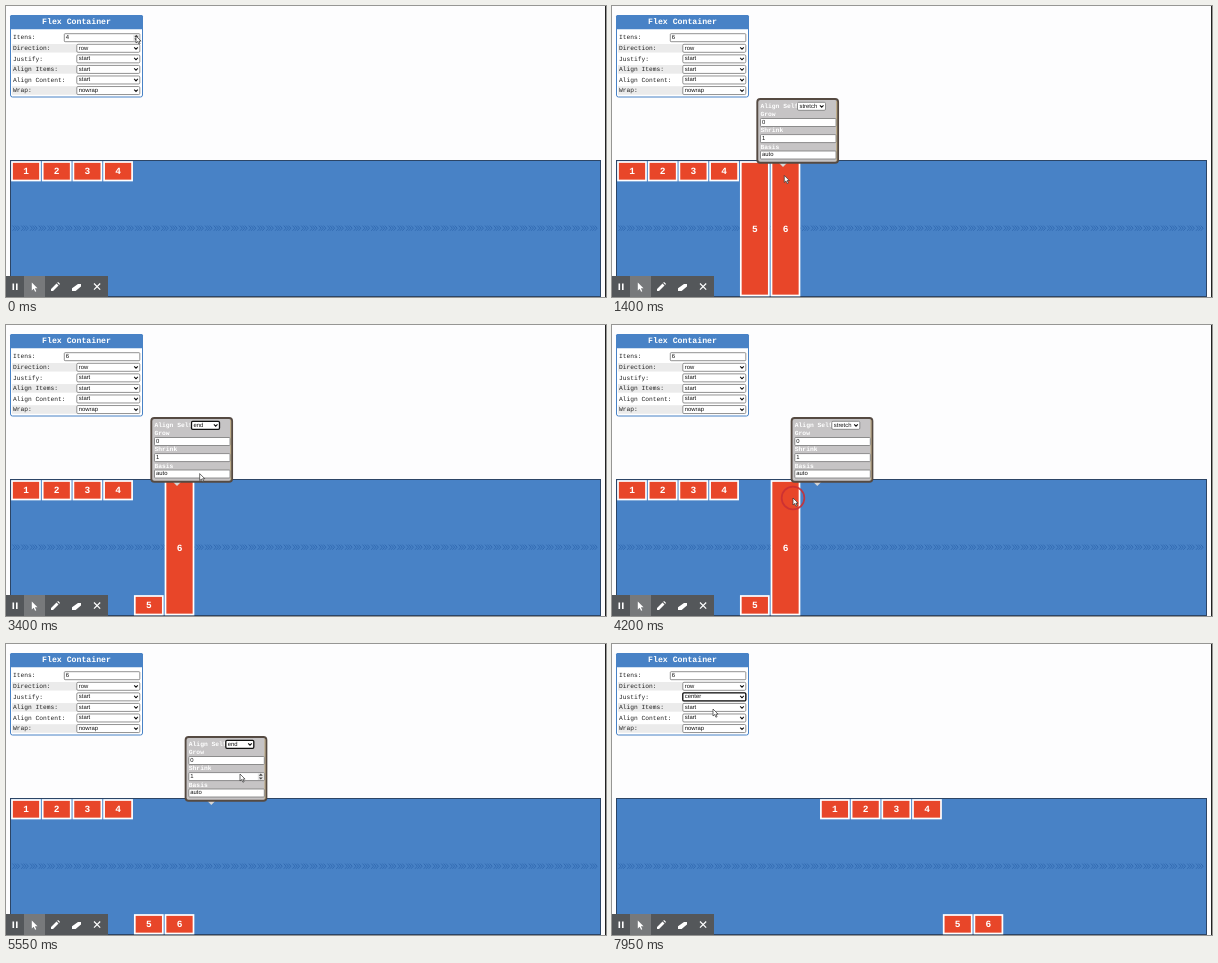
Animation of 600 by 291 pixels, one loop 8 s. Source, as an HTML page:

```html
<!DOCTYPE html>
<html lang="en">
<head>
<meta charset="utf-8">
<title>Flex playground</title>
<style>
html, body { margin: 0; width: 100%; height: 100%; overflow: hidden; background: #fdfdfe; }
svg { display: block; width: 600px; height: 291px; text-rendering: geometricPrecision; }
text { white-space: pre; dominant-baseline: central; }
.mono { font-family: "Liberation Mono", "Noto Sans Mono", monospace; }
.bold { font-weight: 700; }
.sans { font-family: "Liberation Sans", Arial, sans-serif; font-size: 5.9px; fill: #111; }
</style>
</head>
<body>
<svg viewBox="0 0 600 291"><g id="page"></g><g id="live"></g></svg>
<script>
const LOOP = 8000;
const BLUE = '#4882c6', RED = '#e84629';
const page = document.getElementById('page'), live = document.getElementById('live');

const rect = (x, y, w, h, fill, more = '') =>
  `<rect x="${x}" y="${y}" width="${w}" height="${h}" fill="${fill}" ${more}/>`;
const line = (d, color, width, more = '') =>
  `<path d="${d}" fill="none" stroke="${color}" stroke-width="${width}" ${more}/>`;
const mono = (x, y, s, size, fill, more = '', cls = '') =>
  `<text class="mono ${cls}" x="${x}" y="${y}" font-size="${size}" fill="${fill}" ${more}>${s}</text>`;
const value = (x, y, s) => `<text class="sans" x="${x}" y="${y}">${s}</text>`;

const field = (x, y, w, s, h = 8) =>
  rect(x, y - h / 2, w, h, '#fff', 'stroke="#777" stroke-width=".8" rx=".8"') + value(x + 1.5, y + .2, s);

function select(x, y, w, s, focus) {
  const border = focus ? 'stroke="#111" stroke-width="1.3"' : 'stroke="#777" stroke-width=".8"';
  return rect(x, y - 4, w, 8, '#fff', border + ' rx="1.2"') + value(x + 2, y + .2, s) +
    line(`M${x + w - 5.6} ${y - 1}l1.8 1.9l1.8 -1.9`, '#111', 1.1);
}

const spinner = (x, y) => rect(x, y - 3.4, 6, 6.8, '#e4e4e4') +
  `<path d="M${x + 1} ${y - .8}h4l-2 -2.2zM${x + 1} ${y + .8}h4l-2 2.2z" fill="#444"/>`;

// Cursor path: time, x, y
const path = [
  [0, 130, 30], [420, 130, 30], [830, 146, 220], [1100, 147, 220], [1780, 208, 98],
  [2000, 208, 98], [2150, 207, 104], [2550, 205, 118], [2750, 200, 132], [2950, 200, 132],
  [3350, 194, 148], [3900, 181, 173], [4220, 181, 173], [4560, 234, 100], [4680, 234, 101],
  [4850, 232, 131], [5100, 232, 131], [5550, 234, 130], [5750, 234, 130], [6400, 106, 53],
  [6750, 105, 53], [7100, 101, 66], [7750, 101, 66], [7950, 101, 65], [8000, 101, 65]
];
const clicks = [60, 310, 850, 1830, 3960, 4580, 6500];
const RIPPLE = 420;

function cursorAt(t) {
  const i = path.findIndex(p => p[0] > t);
  const [t0, x0, y0] = path[i - 1], [t1, x1, y1] = path[i];
  const u = (t - t0) / (t1 - t0), e = u * u * (3 - 2 * u);
  return [x0 + (x1 - x0) * e, y0 + (y1 - y0) * e];
}

function ripple(t) {
  return clicks.filter(c => t >= c && t < c + RIPPLE).map(c => {
    const u = (t - c) / RIPPLE, [x, y] = cursorAt(c);
    return `<circle cx="${x}" cy="${y}" r="${14.5 - 5.5 * u}" fill="none" stroke="#c92f33"
      stroke-width="${2.4 - 1.2 * u}" opacity="${.95 - .1 * u}"/>`;
  }).join('');
}

function item(n, x, end, tall) {
  const y = end ? 271 : 156, h = tall ? 133.5 : 18.5;
  return rect(x, y, 28, h, RED, 'stroke="#fff" stroke-width="1.7"') +
    mono(x + 14, y + h / 2 + .3, n, 9.5, '#fff', 'text-anchor="middle"', 'bold');
}

function popup(x, align, focus, mx, my) {
  const label = (y, s) => mono(x + 4, y, s, 6.3, '#fff', '', 'bold');
  const inside = mx > x + 4 && mx < x + 79 && my > 128 && my < 137;
  return `<path d="M${x + 22.5} 157h8l-4 4z" fill="#d6d6d6"/>` +
    rect(x + .8, 93, 80.8, 63.8, '#c6c4c5', 'rx="3" stroke="#554a42" stroke-width="1.9"') +
    line(`M${x + 80.2} 95v60`, '#b79d69', .8) +
    label(100.3, 'Align Self') + select(x + 41, 100.3, 28, align, focus) +
    label(108.6, 'Grow') + label(124.7, 'Shrink') + label(141, 'Basis') +
    field(x + 4, 116.5, 75.5, '0') + field(x + 4, 132.6, 75.5, '1') + field(x + 4, 149, 75.5, 'auto') +
    (inside ? spinner(x + 73, 132.6) : '');
}

function drawPage() {
  let s = rect(0, 0, 600, 291, '#fdfdfe') + rect(599, 0, 1, 291, '#222');
  s += rect(4.5, 9.5, 132, 81.5, '#fff', `rx="2" stroke="${BLUE}" stroke-width="1"`);
  s += rect(4, 9, 133, 14.3, BLUE, 'rx="1.5"');
  s += mono(70.5, 16.6, 'Flex Container', 8.2, '#fff', 'text-anchor="middle"', 'bold');
  ['Itens:', 'Direction:', 'Justify:', 'Align Items:', 'Align Content:', 'Wrap:'].forEach((name, i) => {
    const y = 31.7 + i * 10.56;
    if (i % 2) s += rect(6, y - 4.3, 65, 8.6, '#ebebeb');
    s += mono(7, y + .2, name, 6.25, '#222');
  });
  ['row', 'start', 'start', 'start', 'nowrap'].forEach((v, i) => {
    s += select(70.8, 42.3 + i * 10.56, 63, v);
  });
  s += rect(4.5, 154.5, 590, 136, BLUE, 'stroke="#2c4566" stroke-width="1"');
  let d = '';
  for (let x = 6.5; x < 590; x += 8.75)
    for (let k = 0; k < 3; k++) d += `M${x + k * 2.4} 219.6l2.3 2.6l-2.3 2.6`;
  page.innerHTML = s + line(d, '#2f68af', .9);
}

function toolbar() {
  const w = '#fff';
  return rect(0, 270, 102, 21, '#54575a') + rect(18, 270, 21, 21, '#77797b') +
    rect(6.5, 277.5, 1.6, 6.5, w) + rect(10, 277.5, 1.6, 6.5, w) +
    `<path d="M25.8 276.5v8l1.9 -1.7l1.4 3l1.2 -.6l-1.4 -2.9h2.6z" fill="#fff"/>` +
    `<path d="M45 285v-2l5.5 -5.5l2 2l-5.5 5.5zM51.2 276.8l.9 -.9l2 2l-.9 .9z" fill="#fff"/>` +
    `<path d="M66 282.2l6 -4.2h3v2.6l-5.4 4.4h-3.6z" fill="#fff"/>` +
    line('M88 277.5l6.2 6.2M94.2 277.5l-6.2 6.2', w, 1.2);
}

function draw(t) {
  const [mx, my] = cursorAt(t);
  const count = t < 100 ? 4 : t < 350 ? 5 : 6;
  const centered = t >= 7550, end5 = t >= 2950, end6 = t >= 4850;
  let s = field(58.3, 31.7, 75.5, count);
  if (mx > 58 && mx < 134 && my > 27 && my < 36) s += spinner(127.3, 31.7);
  if (t >= 6500) s += select(70.8, 52.86, 63, centered ? 'center' : 'start', centered);

  for (let i = 0; i < count; i++) {
    const end = i === 4 ? end5 : i === 5 && end6;
    s += item(i + 1, (centered ? 208.9 : 6) + i * 30.7, end, i > 3 && !end);
  }
  s += toolbar();
  if (t >= 950 && t < 4050) s += popup(144.5, end5 ? 'end' : 'stretch', t >= 1880, mx, my);
  else if (t >= 4050 && t < 6050) s += popup(178.8, end6 ? 'end' : 'stretch', t >= 4630, mx, my);

  s += ripple(t) + `<path transform="translate(${mx} ${my})" d="M0 0v7l1.7 -1.5l1.2 2.7l1.2 -.5l-1.2 -2.6h2.2z"
    fill="#fff" stroke="#333" stroke-width=".7"/>`;
  live.innerHTML = s;
}

drawPage();
const start = performance.now();
function tick() {
  draw((performance.now() - start) % LOOP);
  requestAnimationFrame(tick);
}
tick();
</script>
</body>
</html>
```
